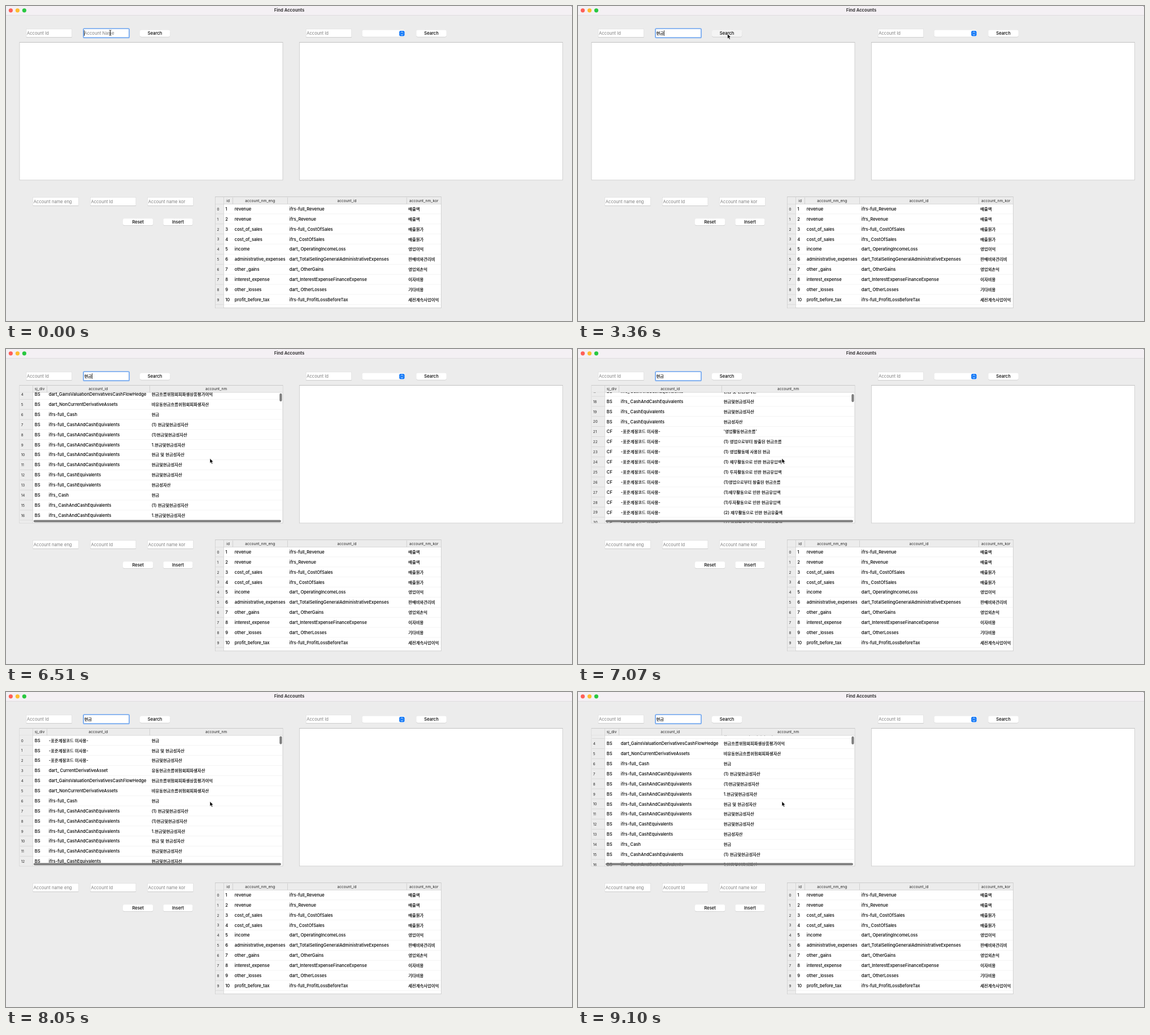
Recreate the animation shown at these times as an HTML page. Size 1002 px wide and 559 px high, loop 9170 ms.

```html
<!DOCTYPE html>
<html lang="en">
<head>
<meta charset="utf-8">
<title>Find Accounts</title>
<style>
html, body { margin: 0; width: 100%; height: 100%; overflow: hidden; background: #000; }
svg { display: block; width: 100vw; height: 100vh; }
text { font: 500 7.61px Inter, "Noto Sans CJK KR", "Noto Sans CJK", sans-serif; fill: #000; white-space: pre; }
.k { font-size: 7.35px; font-family: "Noto Sans CJK KR", "Noto Sans CJK", sans-serif; stroke: #000; stroke-width: .2px; }
.gap { letter-spacing: 1.4px; }
.title { font-weight: 700; fill: #3a383a; }
.hint { font-weight: 400; fill: #808080; }
.head { font-size: 6.5px; font-weight: 400; letter-spacing: .07px; fill: #222; }
.num { font-size: 6.3px; font-weight: 400; fill: #222; }
.mid { text-anchor: middle; }
</style>
</head>
<body>
<svg id="stage" viewBox="0 0 1002 559" preserveAspectRatio="none"></svg>
<script>
const LOOP = 9170, STEP = 70, ROW = 17.88;
const FOUND = 5530;

const rect = (x, y, w, h, fill, more = '') =>
  `<rect x="${x}" y="${y}" width="${w}" height="${h}" fill="${fill}" ${more}/>`;
// Hangul gets its own size; underscores are set loosely beside C, O and r
const rich = s => s
  .replace(/_(?=[CO])|r(?=_)/g, '<tspan class="gap">$&</tspan>')
  .replace(/[\u3131-\u318e\uac00-\ud7a3]+/g, '<tspan class="k">$&</tspan>');
const text = (x, y, s, cls = '') => `<text x="${x}" y="${y}" class="${cls}">${rich(s)}</text>`;
const hline = (x, y, w, c) => rect(x, y, w, .7, c);
const vline = (x, y, h, c) => rect(x, y, .7, h, c);

const field = (x, y, hint) =>
  rect(x, y, 80.5, 14.8, '#fff', 'stroke="#dadada" stroke-width=".6"') +
  hline(x, y + 14.5, 80.5, '#c4c4c4') + text(x + 1, y + 10.2, hint, 'hint');

const button = (x, y, w, label, id = '') =>
  rect(x, y + .7, w, 12, '#c9c9c9', 'rx="3"') +
  rect(x, y, w, 12, '#fff', `rx="3" ${id && `id="${id}"`}`) +
  text(x + w / 2, y + 8.5, label, 'mid');

const panel = (x, y, w, h) =>
  rect(x, y, w, h, '#fff', 'stroke="#c9c9c9" stroke-width=".8"') + hline(x, y - .2, w, '#b9b9b9');

// cols: [left edge, title, text x]; the first is the row number column
function header(cols, y, w, h) {
  const x = cols[0][0], end = x + w;
  let out = rect(x + .4, y + .4, w - .8, 12.3, '#ececec') + hline(x, y + 12.3, w, '#cfcfcf');
  out += rect(x + .4, y + 13, cols[1][0] - x, h - 13.4, '#ececec');
  out += vline(cols[1][0], y, h, '#cfcfcf');
  cols.slice(1).forEach(([left, name], i) => {
    const right = cols[i + 2] ? cols[i + 2][0] : end;
    out += text((left + right) / 2, y + 8.7, name, 'head mid');
    if (i) out += vline(left, y + 1, 11.5, '#c6c6c6');
  });
  return out;
}

function body(cols, y, w, rows) {
  const x = cols[0][0], first = cols[1][0];
  return rows.map((cells, i) => {
    const top = y + i * ROW, base = top + ROW / 2 + 2.75;
    return text(cols[0][2], base - .1, String(i), 'num') +
      cells.map((c, j) => text(cols[j + 1][2], base, c)).join('') +
      hline(x + .5, top + ROW - .5, first - x, '#d2d2d2') +
      hline(first + .7, top + ROW - .5, x + w - first - 1, '#efefef');
  }).join('');
}

const savedCols = [[370.5, '', 373.6], [385, 'id', 388.2], [401.3, 'account_nm_eng', 404.8],
  [498.2, 'account_id', 501.8], [708.9, 'account_nm_kor', 712.2]];
const saved = [
  'revenue|ifrs-full_Revenue|매출액',
  'revenue|ifrs_Revenue|매출액',
  'cost_of_sales|ifrs-full_CostOfSales|매출원가',
  'cost_of_sales|ifrs_CostOfSales|매출원가',
  'income|dart_OperatingIncomeLoss|영업이익',
  'administrative_expenses|dart_TotalSellingGeneralAdministrativeExpenses|판매비와관리비',
  'other_gains|dart_OtherGains|영업외손익',
  'interest_expense|dart_InterestExpenseFinanceExpense|이자비용',
  'other_losses|dart_OtherLosses|기타비용',
  'profit_before_tax|ifrs-full_ProfitLossBeforeTax|세전계속사업이익'
].map((s, i) => [String(i + 1), ...s.split('|')]);

const foundCols = [[24, '', 26.8], [47, 'sj_div', 50.8], [72.3, 'account_id', 75.8], [254.3, 'account_nm', 257.8]];
const NONE = '-표준계정코드 미사용-', FULL = 'ifrs-full_', IFRS = 'ifrs_';
const CCE = 'CashAndCashEquivalents', CE = 'CashEquivalents', asset = '현금및현금성자산';
const balance = [
  [NONE, '현금'], [NONE, '현금 및 현금성자산'], [NONE, asset],
  ['dart_CurrentDerivativeAsset', '유동현금흐름위험회피파생자산'],
  ['dart_GainsValuationDerivativesCashFlowHedge', '현금흐름위험회피파생상품평가이익'],
  ['dart_NonCurrentDerivativeAssets', '비유동현금흐름위험회피파생자산'],
  [FULL + 'Cash', '현금'], [FULL + CCE, '(1) ' + asset], [FULL + CCE, '(1)' + asset],
  [FULL + CCE, '1.' + asset], [FULL + CCE, '현금 및 현금성자산'], [FULL + CCE, asset],
  [FULL + CE, asset], [FULL + CE, '현금성자산'],
  [IFRS + 'Cash', '현금'], [IFRS + CCE, '(1) ' + asset], [IFRS + CCE, '1.' + asset],
  [IFRS + CCE, '현금 및 현금성자산'], [IFRS + CCE, asset], [IFRS + CE, asset], [IFRS + CE, '현금성자산']
];
const flows = [
  "'영업활동현금흐름'", '(1) 영업으로부터 창출된 현금흐름', '(1) 영업활동에 사용된 현금',
  '(1) 재무활동으로 인한 현금유입액', '(1) 투자활동으로 인한 현금유입액', '(1)영업으로부터 창출된 현금흐름',
  '(1)재무활동으로 인한 현금유입액', '(1)투자활동으로 인한 현금유입액', '(2) 재무활동으로 인한 현금유출액',
  '(2) 투자활동으로 인한 현금유출액', '(2)재무활동으로 인한 현금유출액', '(2)투자활동으로 인한 현금유출액',
  '(3) 재무활동 현금흐름', '(3) 투자활동 현금흐름', '1. 영업에서 창출된 현금흐름',
  '1. 영업으로부터 창출된 현금흐름', '1. 영업활동 현금흐름', '1. 재무활동으로 인한 현금유입액',
  '1. 투자활동으로 인한 현금유입액', '1.영업에서 창출된 현금',
  '1.영업활동에서 창출된 현금흐름', '1.재무활동으로 인한 현금유입액', '1.재무활동으로 인한 현금유출액',
  '1.투자활동으로 인한 현금유입액', '1.영업에서 창출된 현금흐름', '1.영업에서창출된현금흐름',
  '1.영업으로부터 창출된 현금흐름', '1.재무활동으로 인한 현금유입액', '1.재무활동으로인한 현금유입액',
  '1.재무활동현금유입', '1.투자활동으로 인한 현금유입', '1.투자활동으로 인한 현금유입액',
  '1.투자활동으로인한현금유입액', '1.투자활동현금유입'
];
const found = [...balance.map(r => ['BS', ...r]), ...flows.map(n => ['CF', NONE, n])];

const lights = ['#fe5f57', '#febc2e', '#28c840']
  .map((c, i) => `<circle cx="${8.4 + i * 12}" cy="7.8" r="3.6" fill="${c}"/>`).join('');

document.getElementById('stage').innerHTML =
  `<defs><clipPath id="rows">${rect(24.4, 77, 465.2, 231.6, '#000')}</clipPath></defs>` +
  '<path d="M0 559V0H1000Q1002 0 1002 2V559Z" fill="#ececec"/>' +
  '<path d="M0 16V0H1000Q1002 0 1002 2V16Z" fill="#f4f0f4"/>' + hline(0, 16, 1002, '#dad6da') +
  lights + text(501.5, 10.3, 'Find Accounts', 'title mid') +
  field(36, 40.9, 'Account Id') +
  rect(137.1, 40.1, 81, 16.2, '#fff', 'rx="1.6" stroke="#7daef0" stroke-width="1.9"') +
  '<text id="typed" x="138.4" y="51.1"></text>' + rect(138.3, 43.2, .8, 9.8, '#000', 'id="caret"') +
  button(237, 42.8, 53.3, 'Search', 'go') +
  field(531.2, 40.9, 'Account Id') +
  rect(630.5, 43.3, 76, 12, '#c9c9c9', 'rx="3"') + rect(630.5, 42.7, 76, 12, '#fff', 'rx="3"') +
  rect(696.2, 43.9, 9.4, 9.6, '#1579f6', 'rx="2.3"') +
  '<path d="M699 47.6l1.9-1.9 1.9 1.9M699 49.8l1.9 1.9 1.9-1.9" fill="none" stroke="#fff" stroke-width=".9"/>' +
  button(726.3, 42.8, 53.5, 'Search') +
  panel(24, 64.4, 466, 244.5) + panel(519.6, 64.4, 466, 244.5) +
  '<g id="found">' + header(foundCols, 64.4, 466, 244.5) +
  '<g clip-path="url(#rows)"><g id="list">' + body(foundCols, 77, 466, found) + '</g></g>' +
  rect(484.3, 78.5, 4.2, 14.2, '#7d7d7d', 'rx="2.1" id="thumb"') +
  rect(48.8, 303.4, 438.2, 4.2, '#7d7d7d', 'rx="2.1"') + '</g>' +
  field(47.8, 339.6, 'Account name eng') + field(149.4, 339.6, 'Account Id') + field(250.8, 339.6, 'Account name kor') +
  button(207, 377.2, 53.3, 'Reset') + button(278.4, 377.2, 52, 'Insert') +
  panel(370.5, 338.8, 400, 197) + header(savedCols, 338.8, 400, 197) + body(savedCols, 351.2, 400, saved) +
  '<circle id="ring" r="13" fill="none" stroke="#000" stroke-opacity=".55"/>' +
  '<path id="beam" d="M-1.8-4.6Q0-4.6 0-3.6Q0-4.6 1.8-4.6M0-3.6V3.8M-1.8 4.8Q0 4.8 0 3.8Q0 4.8 1.8 4.8M-1 1.6H1" fill="none" stroke="#111" stroke-width=".9"/>' +
  '<path id="arrow" d="M0 0V8.3L1.9 6.6 3.3 9.7 4.8 9 3.4 6H6Z" fill="#000" stroke="#fff" stroke-width=".6"/>';

const el = Object.fromEntries(['typed', 'caret', 'go', 'found', 'list', 'thumb', 'ring', 'beam', 'arrow']
  .map(id => [id, document.getElementById(id)]));

const typing = [[0, ''], [210, 'ㅎ'], [700, '혀'], [840, '현'], [1050, '현ㄱ'], [1260, '현그'], [1330, '현금']];
const blinks = [560, 1050, 1540, 2030, 2520, 3080, 5740, 6230, 6720, 7210, 7700, 8190, 8680];
const pointer = [[1400, 184.5, 47.5], [1750, 209.5, 51.6], [2030, 243, 57.5], [2240, 264.7, 49.6],
  [5530, 264.7, 49.6], [5670, 308, 120], [5880, 361, 194.3]];
const scroll = [[6160, 0], [6300, 32], [6580, 92], [6650, 92], [7070, 314.7], [7630, 737],
  [7840, 330], [8050, 0], [8470, 0], [8750, 39.2], [9100, 65.9]];

function at(track, t, k = 1) {
  const i = track.findIndex(p => p[0] > t);
  if (i === 0) return track[0][k];
  if (i < 0) return track[track.length - 1][k];
  const a = track[i - 1], b = track[i];
  return a[k] + (b[k] - a[k]) * (t - a[0]) / (b[0] - a[0]);
}
const within = (t, a, b) => t >= a && t < b;
const show = (node, on) => node.setAttribute('visibility', on ? 'visible' : 'hidden');

let last = -1;
function draw(t) {
  const word = typing.filter(p => p[0] <= t).pop()[1];
  el.typed.innerHTML = word ? rich(word) : 'Account Name';
  el.typed.setAttribute('class', word ? '' : 'hint');
  el.caret.setAttribute('x', 138.3 + word.length * 6.9);
  show(el.caret, blinks.filter(b => b <= t).length % 2 === 0);

  const x = at(pointer, t), y = at(pointer, t, 2);
  const visible = !within(t, 210, 1470), inField = x < 219;
  for (const n of [el.beam, el.arrow, el.ring]) n.setAttribute('transform', `translate(${x} ${y})`);
  show(el.beam, visible && inField);
  show(el.arrow, visible && !inField);
  show(el.ring, within(t, 2310, 2450) || within(t, 3080, 3360));
  el.go.setAttribute('fill', within(t, 3080, 4200) ? '#f4f4f4' : '#fff');

  const s = at(scroll, t);
  el.found.setAttribute('display', t >= FOUND ? 'inline' : 'none');
  el.list.setAttribute('transform', `translate(0 ${-s})`);
  el.thumb.setAttribute('y', 78.5 + s * .0046);
}

const start = performance.now();
function tick() {
  const t = Math.floor(((performance.now() - start) % LOOP) / STEP) * STEP;
  if (t !== last) draw(last = t);
  requestAnimationFrame(tick);
}
tick();
</script>
</body>
</html>
```
